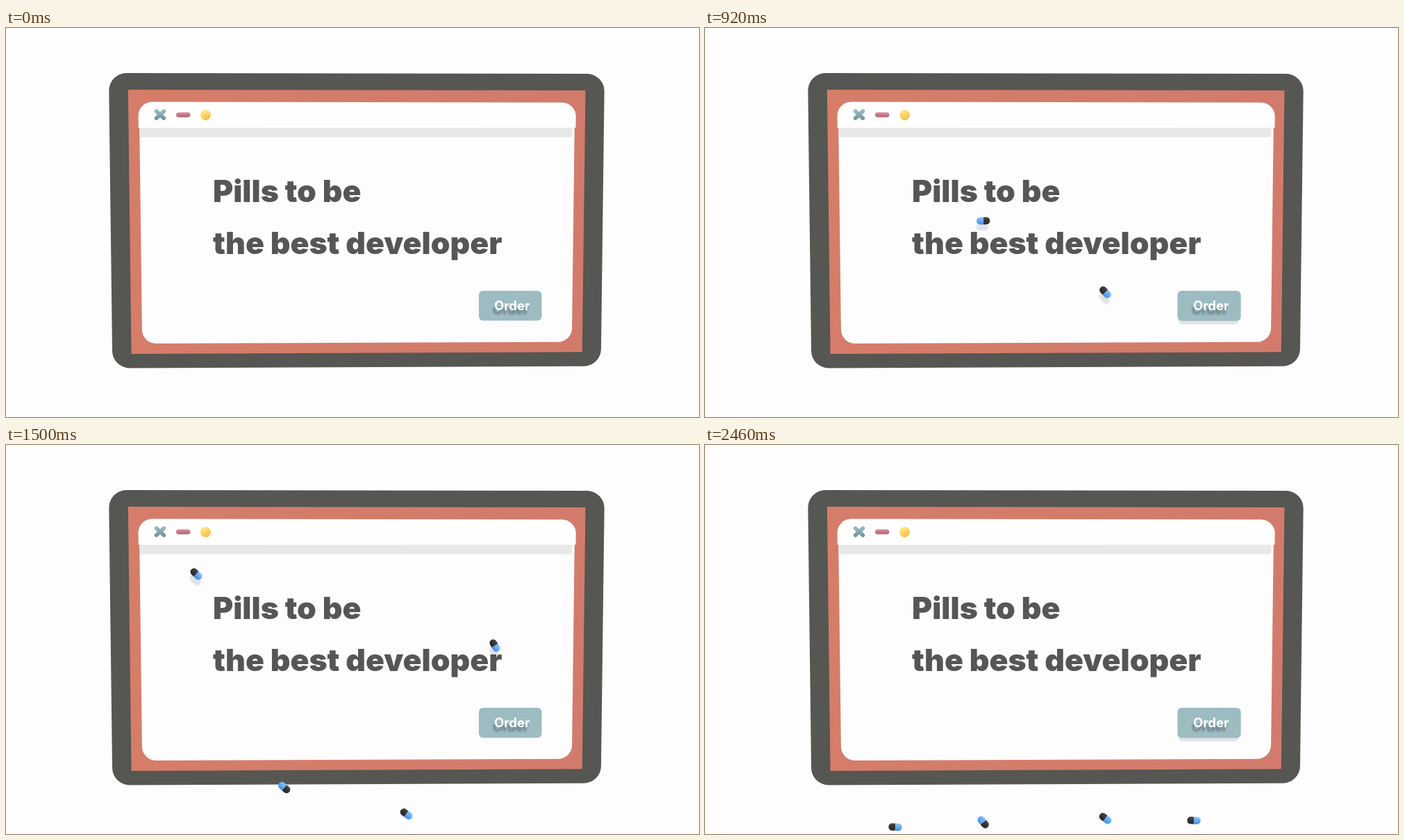
Write an HTML page with a canvas that moves like this. It is 998 by 561 pixels and loops after 2.5 s.

```html
<!DOCTYPE html>
<html lang="en">
<head>
<meta charset="utf-8">
<title>Pills to be the best developer</title>
<style>
  html, body { margin: 0; width: 100%; height: 100%; overflow: hidden; background: #fdfdfd; }
  canvas { display: block; }
</style>
</head>
<body>
<canvas id="stage" width="998" height="561"></canvas>
<script>
const ctx = document.getElementById('stage').getContext('2d');
const LOOP = 2500, STEP = LOOP / 60;
const SECOND_PRESS = 1150, HIDDEN_Y = 120;

const mix = (a, b, u) => a + (b - a) * u;
const clamp = u => Math.min(1, Math.max(0, u));
const ease = u => u * u * (3 - 2 * u);
const progress = (t, start, end) => ease(clamp((t - start) / (end - start)));

// All panels share one slight perspective: taller ones taper more.
function panel(left, top, right, bottom) {
  const h = bottom - top, taper = h * 0.0125;
  return [[left, top], [right, top + 1], [right - taper, bottom - h * 0.007], [left + taper, bottom]];
}

const FRAME = panel(148, 65, 862, 490.5);
const SCREEN = panel(175.8, 89, 834.5, 470);
const PAGE = panel(192, 125, 819, 455);
const BAR = panel(190.3, 106.5, 821, 144);

// Angles run from the black end to the blue end; settle bends the turn early or late.
const PILLS = [
  { x: 576.5, rest: 538.5, start: -75, end: 1625, from: 150, to: 37, settle: 2.5 },
  { x: 400.7, rest: 544, start: 266, end: 1836, from: 148, to: 230, settle: 1 },
  { x: 704, rest: 541.5, start: 769, end: 2453, from: 101, to: 2, settle: 1.1 },
  { x: 274, rest: 551, start: 1187, end: 2452, from: 46, to: 4, settle: 0.3 }
];

function gradient(x0, y0, x1, y1, ...colors) {
  const g = ctx.createLinearGradient(x0, y0, x1, y1);
  colors.forEach((c, i) => g.addColorStop(i / (colors.length - 1), c));
  return g;
}

function trace(points, topRadius, bottomRadius) {
  const [a, b, c, d] = points;
  ctx.beginPath();
  ctx.moveTo((a[0] + d[0]) / 2, (a[1] + d[1]) / 2);
  ctx.arcTo(...a, ...b, topRadius);
  ctx.arcTo(...b, ...c, topRadius);
  ctx.arcTo(...c, ...d, bottomRadius);
  ctx.arcTo(...d, ...a, bottomRadius);
  ctx.closePath();
}

function fillPanel(points, topRadius, bottomRadius, color) {
  trace(points, topRadius, bottomRadius);
  ctx.fillStyle = color;
  ctx.fill();
}

function fillRound(x, y, w, h, r, color) {
  ctx.beginPath();
  ctx.roundRect(x, y, w, h, r);
  ctx.fillStyle = color;
  ctx.fill();
}

function label(text, x, y, font, color) {
  ctx.font = font + ' Inter, "Open Sans", sans-serif';
  ctx.fillStyle = color;
  ctx.fillText(text, x, y);
}

function drawMonitor() {
  fillPanel(FRAME, 25, 25, '#565653');
  fillPanel(SCREEN, 0, 0, gradient(176, 0, 834, 0, '#d57d69', '#d27b6c'));
  fillPanel(PAGE, 0, 20, '#fdfdfe');
  fillRound(192.5, 140, 623, 17.5, [0, 0, 4, 2], '#e8e8e8');
  label('Pills to be', 298, 251, '900 44.5px', '#565657');
  label('the best developer', 298, 326, '900 44.5px', '#565657');
}

function drawBar() {
  fillPanel(BAR, 20, 0, '#fefefe');

  ctx.lineCap = 'round';
  ctx.lineWidth = 5.8;
  ctx.strokeStyle = gradient(0, 117, 0, 133, '#9fbfc8', '#86a8b3', '#6e8d98');
  ctx.beginPath();
  for (const s of [-1, 1]) {
    ctx.moveTo(222 - 5.3, 125 - 5 * s);
    ctx.lineTo(222 + 5.3, 125 + 5 * s);
  }
  ctx.stroke();

  fillRound(245, 121.5, 20.5, 7.2, 3.6, gradient(0, 121, 0, 129, '#e0a0ac', '#cb7889', '#ab6373'));
  fillRound(280, 118, 15, 15, 7.5, gradient(284, 118, 291, 133, '#ffe793', '#ffd462', '#f4b650'));
}

function drawButton(t) {
  const sincePress = t < SECOND_PRESS ? t : t - SECOND_PRESS;
  const lift = progress(sincePress, 330, 800);

  if (lift > 0) {
    ctx.save();
    ctx.filter = 'blur(0.7px)';
    fillRound(682, 385, 86, 38 + 4.5 * lift, 5, '#e3e3e6');
    ctx.restore();
  }
  fillRound(681 - 0.6 * lift, 379, 90.5 + 0.8 * lift, 43 + 0.4 * lift, 6, '#9dbcc1');

  const font = '700 18.5px';
  ctx.save();
  ctx.beginPath();
  ctx.rect(681, 402, 90, 20);
  ctx.clip();
  ctx.filter = 'blur(1.4px)';
  label('Order', 701, 413, font, 'rgba(82,100,105,0.75)');
  ctx.restore();
  label('Order', 703, 407, font, '#fff');
}

function capsule(x, y, angle, w, h) {
  ctx.translate(x, y);
  ctx.rotate(angle);
  ctx.beginPath();
  ctx.roundRect(-w / 2, -h / 2, w, h, h / 2);
}

function drawShadow(x, y, angle) {
  const fade = clamp((y - 135) / 20);
  const strength = y > 445 ? 0.45 : 0.12;
  ctx.save();
  trace(FRAME, 25, 25);
  ctx.clip();
  ctx.filter = 'blur(1.2px)';
  capsule(x - 1.5, y + 9, angle, 18, 10);
  ctx.fillStyle = `rgba(35,35,45,${strength * fade})`;
  ctx.fill();
  ctx.restore();
}

function drawPill({ x, rest, start, end, from, to, settle }, t) {
  if (t < start) return;
  const p = progress(t, start, end);
  const y = mix(HIDDEN_Y, rest, p);
  const angle = mix(from, to, 1 - (1 - p) ** settle) * Math.PI / 180;
  drawShadow(x, y, angle);

  const top = Math.cos(angle) < 0 ? 5 : -5;
  ctx.save();
  capsule(x, y, angle, 19.5, 10.5);
  ctx.clip();
  ctx.fillStyle = gradient(0, top, 0, -top, '#4a4a4d', '#333336', '#28282b');
  ctx.fillRect(-10, -6, 10, 12);
  ctx.fillStyle = gradient(0, top, 0, -top, '#84c2fa', '#62acf7', '#468de0');
  ctx.fillRect(0, -6, 10, 12);
  ctx.restore();
}

function render(now) {
  const t = Math.floor((now % LOOP + 5) / STEP) % 60 * STEP;
  ctx.fillStyle = '#fdfdfd';
  ctx.fillRect(0, 0, 998, 561);
  drawMonitor();
  drawButton(t);
  PILLS.forEach(pill => drawPill(pill, t));
  drawBar();
}

const begin = performance.now();
function tick() {
  render(performance.now() - begin);
  requestAnimationFrame(tick);
}
tick();
</script>
</body>
</html>
```
